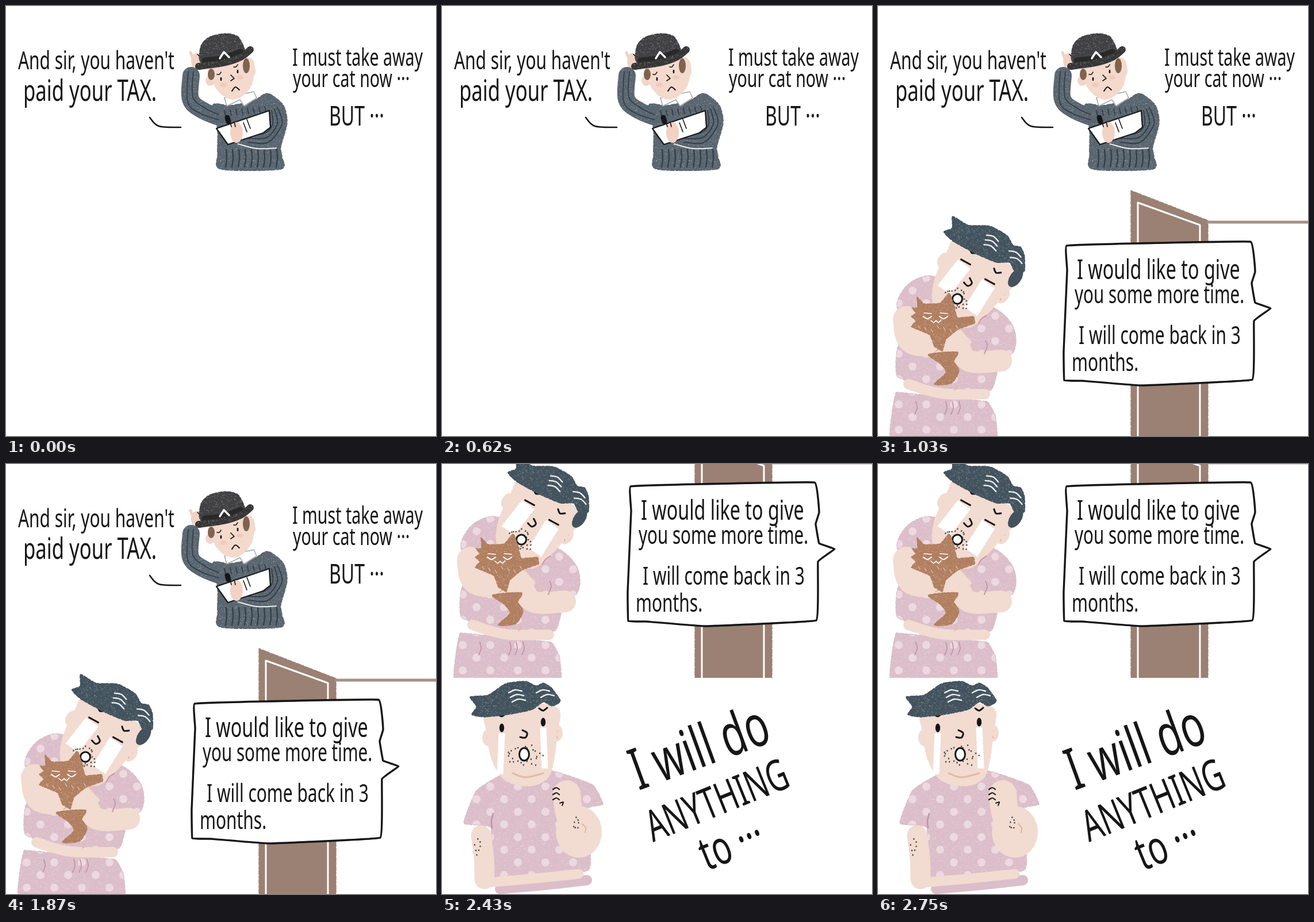
Write an HTML page with a canvas that moves like this. It is 748 px wide and 748 px high and loops after 2960 ms.

```html
<!DOCTYPE html>
<html lang="en">
<head>
<meta charset="utf-8">
<title>Tax comic</title>
<style>
html, body { margin: 0; width: 100%; height: 100%; overflow: hidden; background: #fff; }
canvas { display: block; width: 100vw; height: 100vh; }
</style>
</head>
<body>
<canvas id="stage" width="748" height="748"></canvas>
<script>
const SIZE = 748, LOOP = 2960, MEET = 1030, NEXT = 2430, SCROLL = 378;
const INK = '#161616', SKIN = '#f2dbd0', BLUSH = '#dfae9e', SHIRT = '#dbbec9', FOLD = '#c592a6';
const HAIR = '#43535e', WOOL = '#59656f', RIB = '#343f49', CAT = '#b17f60', DOOR = '#9b8173';
const NARROW = 0.68; // one slim lettering style for every line
let g, seed = 7;

function rand() {
  seed = (seed * 16807) % 2147483647;
  return seed / 2147483647;
}

function tile(w, h, draw) {
  const c = document.createElement('canvas');
  c.width = w;
  c.height = h;
  const t = c.getContext('2d');
  draw(t);
  return t.createPattern(c, 'repeat');
}

const chalk = tile(160, 160, t => {
  t.fillStyle = 'rgba(255,255,255,.25)';
  for (let i = 0; i < 1600; i++) t.fillRect(rand() * 160, rand() * 160, 1 + rand(), 1);
});

const polka = tile(48, 44, t => {
  t.fillStyle = '#edd8df';
  for (const k of [0.25, 0.75]) {
    t.beginPath();
    t.arc(48 * k, 44 * k, 7, 0, 7);
    t.fill();
  }
});

// Path through "x,y" points: straight when bend is 0, Catmull-Rom when 1.
function trace(s, closed, bend) {
  const p = s.split(' ').map(q => q.split(',').map(Number)), n = p.length;
  const at = i => closed ? p[(i + n) % n] : p[Math.max(0, Math.min(n - 1, i))];
  const path = new Path2D(), k = bend / 6;
  path.moveTo(...p[0]);
  for (let i = 0; i < (closed ? n : n - 1); i++) {
    const [a, b, c, d] = [-1, 0, 1, 2].map(j => at(i + j));
    path.bezierCurveTo(b[0] + (c[0] - a[0]) * k, b[1] + (c[1] - a[1]) * k,
      c[0] - (d[0] - b[0]) * k, c[1] - (d[1] - b[1]) * k, ...c);
  }
  if (closed) path.closePath();
  return path;
}

function line(s, width = 2, color = INK, bend = 1, closed = false) {
  g.strokeStyle = color;
  g.lineWidth = width;
  g.stroke(trace(s, closed, bend));
}

function shape(s, color, bend = 1, ...textures) {
  const path = trace(s, true, bend);
  for (const style of [color, ...textures]) {
    g.fillStyle = style;
    g.fill(path);
  }
  g.setLineDash([4, 3, 7, 2]);
  line(s, 1.4, color, bend, true);
  g.setLineDash([]);
}

function limb(s, width, color) {
  line(s, width, color);
  line(s, width, chalk);
}

function blob(x, y, rx, ry, color, edge = 0) {
  g.beginPath();
  g.ellipse(x, y, rx, ry, 0, 0, Math.PI * 2);
  g.fillStyle = color;
  g.fill();
  g.strokeStyle = INK;
  g.lineWidth = edge;
  if (edge) g.stroke();
}

function write(text, x, y, size, angle = 0) {
  g.save();
  g.translate(x, y);
  g.rotate(angle * Math.PI / 180);
  g.scale(NARROW, 1);
  g.font = `${size}px "Noto Sans", "Open Sans", sans-serif`;
  g.fillStyle = INK;
  g.fillText(text, 0, 0);
  g.restore();
}

function specks(x, y, rx, ry, n) {
  for (let i = 0; i < n; i++) {
    const r = Math.sqrt(0.2 + 0.8 * rand());
    blob(x + Math.cos(i * 2.4) * rx * r, y + Math.sin(i * 2.4) * ry * r, 1.2, 1.5, '#4a4441');
  }
}

function officer() {
  write("And sir, you haven't", 21, 110, 44);
  write('paid your TAX.', 30, 165, 51);
  write('I must take away', 498, 104, 42);
  write('your cat now ···', 499, 141, 42);
  write('BUT ···', 562, 208, 47);
  line('250,194 266,209 304,211', 2.6);

  // Raised arm, sweater and its ribs
  blob(331, 96, 9, 14, '#f1d3c5');
  line('327,96 321,81', 5, '#f1d3c5');
  line('333,84 337,88', 1.5);
  limb('322,121 321,162 343,182 384,198', 30, WOOL);
  shape('360,172 390,173 430,165 455,152 482,172 489,203 478,245 480,262 477,284 374,284 368,258 368,215', WOOL, 0.8, chalk);
  for (const i of [-5, 4]) line(`${322 + i},114 ${321 + i},${162 - i} ${343 + i},${182 - i} 370,${193 - i}`, 1.8, RIB);
  for (let x = 383; x < 476; x += 11) line(`${x},250 ${x + 1},265 ${x - 1},280`, 2.4, RIB);
  for (let i = 0; i < 8; i++) line(`${380 + i * 10},${182 - i} ${382 + i * 10},${191 - i}`, 2, RIB);
  for (let i = 0; i < 3; i++) line(`${462 + i * 5},${182 - i * 3} ${464 + i * 8},205 ${450 + i * 3},${221 + i * 8} 421,${223 + i * 7}`, 2, RIB);
  line('404,240 436,248 470,247', 2, '#eef0f1');

  // Collar and face
  const collar = '380,160 384,174 407,163 414,174 436,160 431,149';
  shape(collar, '#fff', 0);
  line(collar, 1.5, '#a5a7a8', 0, true);
  blob(355, 130, 8, 9, '#f3d6c9');
  blob(426, 113, 8, 11, '#f3d6c9');
  shape('357,105 361,135 381,158 405,160 428,134 425,91', '#f4d9cd');
  for (const [x, y] of [[377, 134], [406, 121]]) {
    blob(x + 1, y + 3, 6, 4, '#f2cabd');
    blob(x - 3, y - 7, 1.4, 3.2, INK);
    line(`${x - 10},${y - 15} ${x - 6},${y - 15} ${x - 3},${y - 19}`, 1.6);
  }
  blob(357, 119, 6, 10, '#80634f');
  blob(418, 104, 6, 13, '#80634f');
  line('391,120 397,126 391,130', 1.7, INK, 0);
  line('393,148 399,141 406,146');

  // Hat
  shape('342,100 339,70 354,54 382,48 405,55 413,88', '#414143', 0.8, chalk);
  line('346,95 378,91 408,80', 11, '#29292a');
  limb('335,105 378,99 408,89 425,76', 12, '#363637');
  line('372,91 379,80 388,89', 3.4, '#fff', 0);

  // Notes
  const board = '366,213 458,182 460,211 447,221 386,241';
  shape(board, '#fff', 0);
  line(board, 2.2, INK, 0, true);
  for (const x of [413, 419]) line(`${x},${616 - x} ${x + 6},${632 - x}`, 1.6);
  line('385,194 387,201', 9);
  blob(401, 220, 11, 18, '#f2d2c4');
  for (const x of [390, 397]) line(`${x},201 ${x + 2},210`, 1.6);
}

// The taxpayer's head, drawn around the point between the ears.
function head(x, y, angle, sobbing) {
  const drop = sobbing ? 13 : 0, shift = sobbing ? -5 : 0;
  g.save();
  g.translate(x, y);
  g.rotate(angle * Math.PI / 180);
  for (const side of [-1, 1]) {
    blob(side * 59, -side * 4, 11, 15, SKIN);
    line(`${side * 61},-8 ${side * 57},-3 ${side * 61},5`, 1.6, BLUSH);
  }
  shape('-58,-50 -61,0 -52,45 -30,78 10,88 42,76 54,45 59,0 56,-50', SKIN);
  if (!sobbing) line('-17,66 5,73 36,66', 3, '#e5b9a2');
  for (const side of [-1, 1]) {
    const ex = side * (sobbing ? 27 : 36), ey = (sobbing ? -12 : -18) - side * (sobbing ? -2 : 5);
    const half = sobbing ? 13 : 5, top = ey + (sobbing ? 4 : 10), end = top + (sobbing ? 56 : 70);
    const foot = ex + side * 3;
    shape(`${ex - half},${top} ${ex + half},${top} ${foot + half},${end} ${foot - half},${end}`, '#fff', 0);
    if (sobbing) line(`${ex - 9},${ey} ${ex + 9},${ey - 2}`, 3);
    else blob(ex, ey, 4.2, 7.5, INK);
    line(`${ex - 7},${ey - 24} ${ex},${ey - 20} ${ex + 7},${ey - 25}`, 3);
  }
  specks(3 + shift, 35 + drop, sobbing ? 24 : 33, 21, 26);
  line(`${shift},${drop - 9} ${shift + 8},${drop - 4} ${shift + 5},${drop + 4} ${shift - 4},${drop + 3}`, 3);
  blob(3 + shift, 33 + drop, 8.5, sobbing ? 8.5 : 11, '#fff', 3);
  if (sobbing) blob(60, -42, 10, 18, HAIR);
  shape('-91,-67 -60,-70 -29,-90 5,-94 24,-86 36,-91 50,-83 66,-60 52,-51 36,-58 17,-45 -20,-37 -65,-32 -88,-36 -80,-50', HAIR, 0.6, chalk);
  for (let i = 0; i < 5; i++) {
    const hx = i < 3 ? -24 + i * 3 : i * 8, hy = -74 + i % 3 * 8;
    line(`${hx},${hy} ${hx + 11},${hy - 5} ${hx + 23},${hy - 3}`, 2.3, '#f0f2f3');
  }
  g.restore();
}

function cat() {
  shape('68,506 80,518 108,517 124,499 132,520 138,542 166,540 168,552 140,562 118,580 112,600 98,592 90,572 58,558 66,548 58,540 66,534 59,525 69,525', CAT, 0.3, chalk);
  shape('88,606 138,602 132,618 141,634 128,656 98,658 118,638 108,622', CAT, 0.8, chalk);
  for (const x of [86, 114]) {
    line(`${x - 7},540 ${x},544 ${x + 7},540`, 2, '#fff');
    line(`${x - 6},534 ${x + 7},535`, 1.5, '#fff');
  }
  line('92,547 97,551 101,547 105,551 110,546', 1.6, '#fff', 0);
  for (let i = 0; i < 7; i++) line(`${70 + i * 11},${556 + i % 3 * 3} ${73 + i * 11},${561 + i % 3 * 3}`, 1.2, '#dfc4b3');
}

function hug() {
  // Pyjamas and belly
  shape('100,471 55,482 33,523 66,560 130,580 190,612 234,604 236,560 200,524 140,515', SHIRT, 1, polka, chalk);
  shape('36,590 100,596 207,612 197,668 120,674 34,645', SHIRT, 0.4, polka, chalk);
  shape('32,672 110,680 190,688 204,712 205,760 23,760 24,710', SHIRT, 0.2, polka, chalk);
  line('53,658 110,674 186,675', 18, SKIN);
  line('132,659 139,663 133,668', 2, '#e6b8a6');
  for (const x of [66, 118, 129, 141]) line(`${x},688 ${x + 2},699 ${x - 2},710`, 1.8, FOLD);

  head(166, 473, 35, true);

  // Arms around the cat
  line('49,545 61,583 128,587', 46, SKIN);
  line('136,581 158,617 214,617', 38, SKIN);
  line('144,562 162,582 178,598', 1.8, '#e8c4b8');
  line('98,583 106,594 100,601', 1.6, BLUSH);
  line('189,538 180,544 175,552', 1.8, FOLD);
  line('187,582 190,591 185,605', 1.8, FOLD);
  cat();

  // Door
  shape('440,321 574,373 574,760 440,760', DOOR, 0);
  line('452,760 452,342 560,381 560,760', 3, '#fff', 0);
  line('574,376 760,376', 5, '#a69084');

  // Speech
  const bubble = '328,417 448,413 648,410 656,462 650,482 656,516 683,526 654,548 651,650 458,660 355,652 324,651 323,600 329,460';
  shape(bubble, '#fff', 0);
  line(bubble, 3.4, INK, 0.15, true);
  write('I would like to give', 346, 475, 47.5);
  write('you some more time.', 342, 517, 43.5);
  write('I will come back in 3', 349, 588, 44);
  write('months.', 337, 635, 44);
}

function plea() {
  shape('108,539 60,568 38,625 85,633 89,728 255,706 250,602 280,592 262,558 192,534', SHIRT, 0.4, polka, chalk);
  line('101,739 180,732 252,724', 18, SHIRT);
  line('68,646 73,685 74,722', 35, SKIN);
  line('68,729 150,722 238,713', 17, SKIN);
  line('89,608 86,621 87,633', 2.6, FOLD);
  specks(62, 665, 6, 16, 7);

  head(140, 472, 0, false);

  // Raised fist
  line('217,574 222,610 238,642', 48, SKIN);
  blob(238, 640, 40, 45, SKIN);
  for (let y = 566; y < 590; y += 9) line(`193,${y} 199,${y - 3} 204,${y}`, 2.2);
  line('205,590 211,588 209,594');
  specks(233, 624, 6, 12, 7);
  line('244,626 250,633 249,641', 1.8, BLUSH);

  write('I will do', 342, 568, 101, -20);
  write('ANYTHING', 367, 658, 75.5, -22);
  write('to ···', 461, 708, 82, -22);
}

function layer(draw) {
  const c = document.createElement('canvas');
  c.width = SIZE;
  c.height = SIZE + 2;
  g = c.getContext('2d');
  g.lineCap = g.lineJoin = 'round';
  draw();
  return c;
}

const [first, second, third] = [officer, hug, plea].map(layer);
const stage = document.getElementById('stage').getContext('2d');
const start = performance.now();

function frame() {
  const t = (performance.now() - start) % LOOP;
  stage.fillStyle = '#fff';
  stage.fillRect(0, 0, SIZE, SIZE);
  if (t < NEXT) {
    stage.drawImage(first, 0, 0);
    if (t >= MEET) stage.drawImage(second, 0, 0);
  } else {
    stage.drawImage(second, 0, -SCROLL);
    stage.drawImage(third, 0, 0);
  }
  requestAnimationFrame(frame);
}
frame();
</script>
</body>
</html>
```
